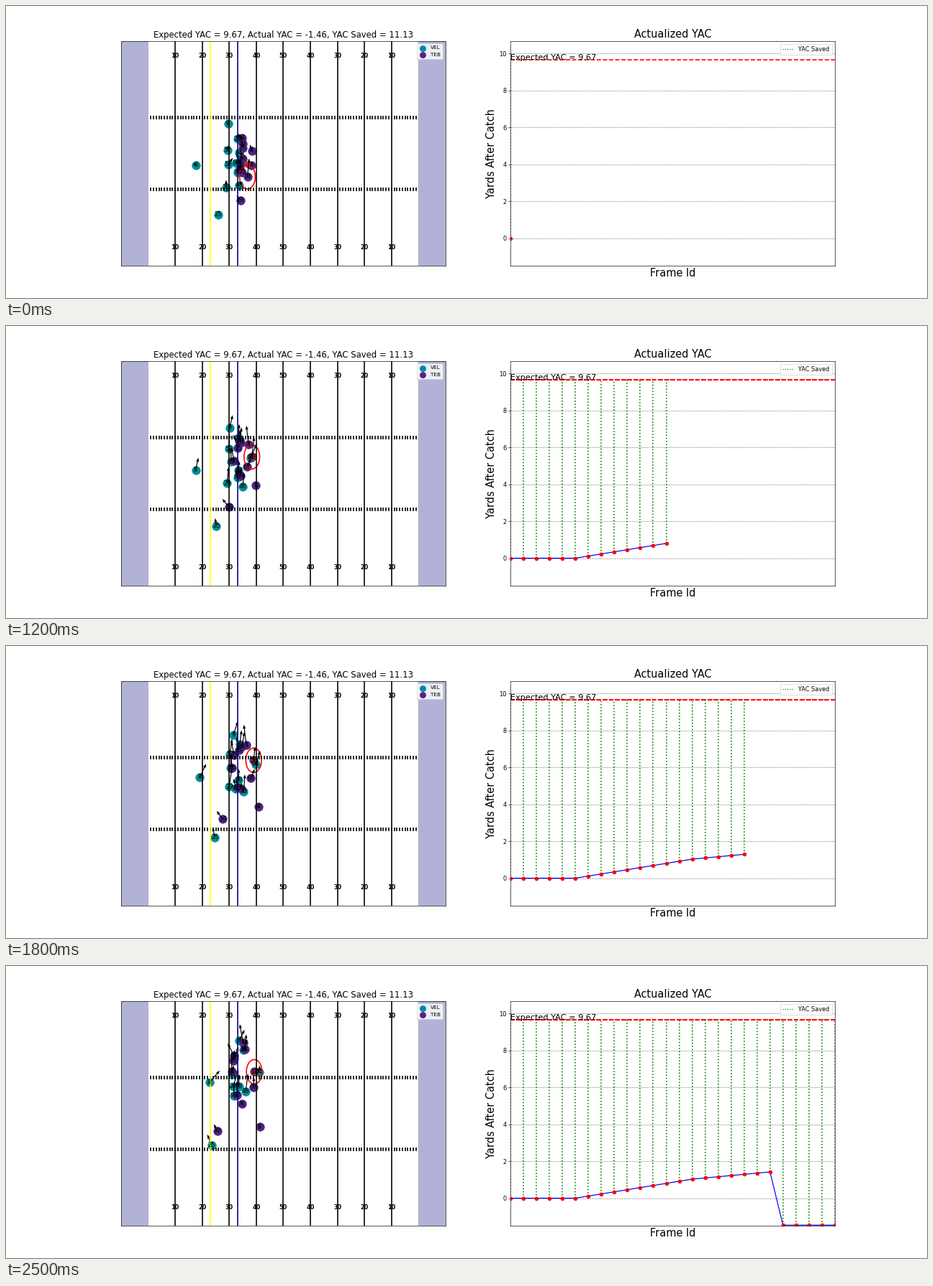
Write a matplotlib script that moves like this. It is 1280 px wide and 407 px high and loops after 2.6 s.

```python
import numpy as np
import matplotlib.pyplot as plt
from matplotlib.animation import FuncAnimation
from matplotlib.lines import Line2D
from matplotlib.patches import Ellipse

FRAMES, INTERVAL = 26, 100
WIDTH, HEIGHT = 1280, 407
DPI = WIDTH / 22
FIELD_W, FIELD_H = 120, 53.3
EXPECTED = 9.67
TEAL, PURPLE = "#008E97", "#4F2683"

# Keyed steps of each path; a cubic runs through the four stage positions.
KEYS = np.array([0, 8, 16, 25])

DEFENCE = [
    ("8", (264, 222), (262, 210.5), (267, 189), (282.5, 162.5)),
    ("9", (308.5, 164), (308.5, 152.5), (314, 130), (324, 104)),
    ("52", (307.5, 201), (309, 184), (310.5, 157.5), (316.5, 129)),
    ("55", (309, 221), (313, 202), (312.5, 176), (313.5, 151)),
    ("29", (306, 253), (306.5, 233), (309, 204), (316, 168)),
    ("25", (294.5, 290.5), (293, 285), (291, 271), (285.5, 250)),
    ("43", (323.5, 250), (328, 235.5), (330, 210), (333, 175)),
    ("20", (321.5, 185.5), (322.5, 168.5), (324, 143.5), (329.5, 117)),
    ("94", (324, 205), (334.5, 195), (345, 171), (351.5, 148)),
    ("98", (320, 219), (323, 209), (323.5, 192), (323.5, 168)),
    ("93", (322, 231.5), (323, 218), (320, 203), (317, 181)),
]
OFFENCE = [
    ("84", (327.5, 184), (324.5, 170), (327, 147), (331.5, 116.5)),
    ("4", (341.5, 202), (338.5, 181), (335, 147.5), (329.5, 107)),
    ("83", (328.5, 192), (327, 173.5), (325, 151), (317, 125)),
    ("75", (328.5, 198), (325.5, 182), (318.5, 158), (315.5, 132)),
    ("67", (328.5, 213), (331, 203), (338.5, 188.5), (344, 169)),
    ("56", (326, 221), (319.5, 200), (315, 176), (313.5, 147)),
    ("73", (325, 227), (324.5, 213), (322.5, 201), (321, 180)),
    ("71", (328, 232), (326, 216), (326.5, 202), (327.5, 192.5)),
    ("8", (341, 222), (344, 221.5), (349.5, 223.5), (352.5, 224.5)),
    ("19", (325.5, 270.5), (316, 259.5), (304, 245), (293.5, 229.5)),
    ("18", (335.5, 238), (339.5, 201), (343.5, 166), (345, 147.5)),
]
BALL = [(336, 221), (340, 201), (344, 166), (346, 148.5)]


def to_yards(points):
    """Stage pixels to field yards."""
    scale_x = WIDTH * 0.775 / 2.2 / FIELD_W
    scale_y = HEIGHT * 0.77 / FIELD_H
    p = np.asarray(points, float)
    return np.stack([(p[..., 0] - WIDTH * 0.125) / scale_x,
                     (HEIGHT * 0.89 - p[..., 1]) / scale_y], axis=-1)


def cubic(paths):
    """Coefficients (power, path, axis) through the keyed positions."""
    pts = to_yards(paths)
    coef = np.linalg.solve(np.vander(KEYS, 4), pts.transpose(1, 0, 2).reshape(4, -1))
    return coef.reshape(4, len(paths), 2)


def place(coef, t):
    return np.tensordot([t**3, t**2, t, 1], coef, 1)


def velocity(coef, t):
    return 10 * np.tensordot([3 * t**2, 2 * t, 1, 0], coef, 1)


steps = np.arange(FRAMES)
actual = np.interp(steps, [5, 14, 20], [0, 1.03, 1.42])
actual[21:] = -1.46

fig, (field, chart) = plt.subplots(1, 2, figsize=(WIDTH / DPI, HEIGHT / DPI), dpi=DPI)

# Field
field.set(xlim=(0, FIELD_W), ylim=(0, FIELD_H), xticks=[], yticks=[])
field.set_title("Expected YAC = 9.67, Actual YAC = -1.46, YAC Saved = 11.13",
                fontsize=14.4)
for x in (0, 110):
    field.axvspan(x, x + 10, color="navy", alpha=0.3, lw=0.1, zorder=0)
for x in range(20, 110, 10):
    field.axvline(x, color="black", lw=2)
    for y in (4, FIELD_H - 4):
        field.text(x, y, str(50 - abs(x - 60)), ha="center",
                   fontsize=10, weight="bold")
for y in (18.2, FIELD_H - 18.2):
    field.vlines(range(11, 110), y - 0.4, y + 0.4, color="black", lw=2)
field.axvline(33, color="yellow", lw=2)
field.axvline(43, color="navy", lw=2)

teams = []
for roster, color, name in ((DEFENCE, TEAL, "VEL"), (OFFENCE, PURPLE, "TEB")):
    coef = cubic([row[1:] for row in roster])
    dots = field.scatter(*place(coef, 0).T, s=200, color=color, zorder=1)
    labels = [field.text(0, 0, row[0], ha="center", va="center", fontsize=10)
              for row in roster]
    zero = np.zeros(len(roster))
    arrows = field.quiver(zero, zero, zero, zero, angles="xy", scale_units="xy",
                          scale=1, units="dots", width=1.2, headwidth=3.4,
                          headlength=4.5, headaxislength=4.5, zorder=1.5)
    field.scatter([], [], s=100, color=color, label=name)
    teams.append((coef, dots, labels, arrows))
field.legend(loc="upper right", fontsize=9, handlelength=1.5).set_zorder(5)

ball_path = cubic([BALL])
ball = field.scatter([0], [0], s=100, color="brown", zorder=1.2)
ring = Ellipse((0, 0), 5.8, 5.8, fill=False, ec="red", lw=2, zorder=1.2)
field.add_patch(ring)

# Chart
chart.set(xlim=(0, FRAMES - 1), ylim=(-1.5, EXPECTED + 1), xticks=[])
chart.set_title("Actualized YAC", fontsize=18)
chart.set_xlabel("Frame Id", fontsize=18)
chart.set_ylabel("Yards After Catch", fontsize=18)
chart.grid(axis="y", color="gray", ls="--", lw=0.8)
chart.set_axisbelow(True)
chart.text(0, EXPECTED, "Expected YAC = 9.67", fontsize=14)
chart.legend(handles=[Line2D([], [], color="green", ls=":", label="YAC Saved")],
             loc="upper right")
# The limit line is laid down again at every step, so its edges firm up.
limits = [chart.axhline(EXPECTED, color="red", ls="--", lw=2) for _ in steps]
saved = chart.vlines([0], 0, EXPECTED, color="green", ls=":", lw=2)
curve, = chart.plot([], [], color="blue", lw=1.5)
marks, = chart.plot([], [], "ro")


def update(i):
    for coef, dots, labels, arrows in teams:
        pos = place(coef, i)
        dots.set_offsets(pos)
        arrows.set_offsets(pos)
        arrows.set_UVC(*(0.62 * velocity(coef, i)).T)
        for label, xy in zip(labels, pos):
            label.set_position(xy)
    ball.set_offsets(place(ball_path, i))
    ring.set_center(place(teams[1][0], i)[-1])

    shown = steps[:i + 1]
    for k, line in enumerate(limits):
        line.set_visible(k <= i)
    saved.set_segments([[(k, actual[k]), (k, EXPECTED)] for k in shown])
    for line in (curve, marks):
        line.set_data(shown, actual[:i + 1])


anim = FuncAnimation(fig, update, frames=FRAMES, interval=INTERVAL,
                     repeat=True, repeat_delay=0)
plt.show()
```
